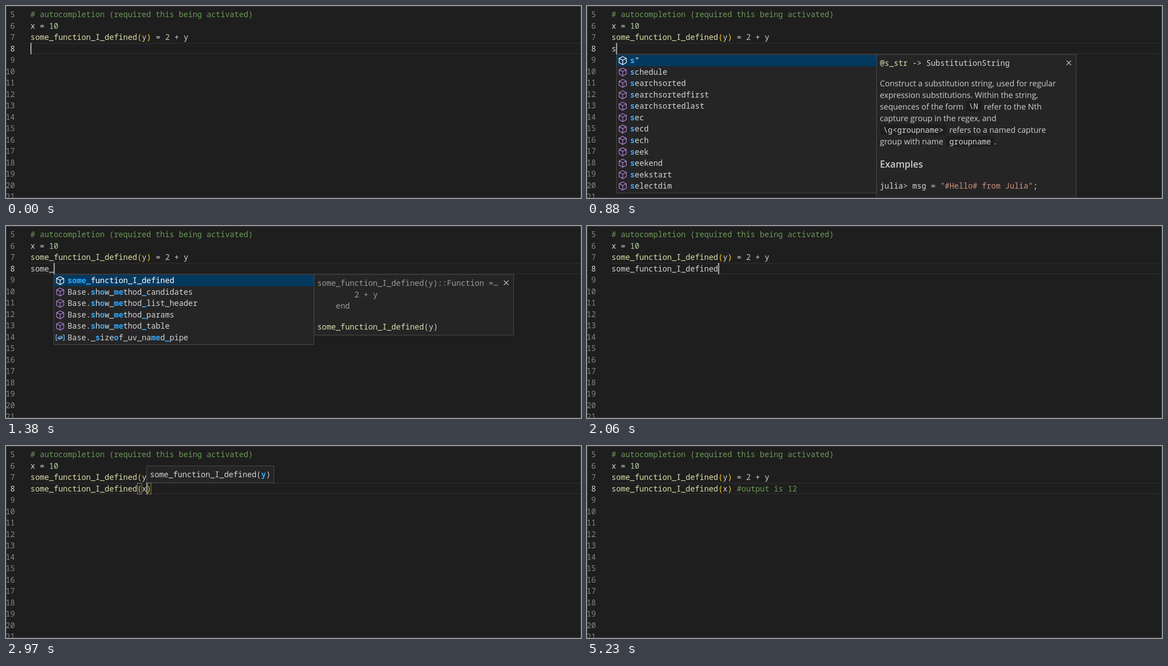
These frames come from a looping animation (1280 px wide and 430 px high, 5380 ms). An HTML page with a canvas:

```html
<!DOCTYPE html>
<html lang="en">
<head>
<meta charset="utf-8">
<title>Editor autocompletion</title>
<style>
html, body { margin: 0; width: 100%; height: 100%; overflow: hidden; background: #1e1e1e; }
canvas { display: block; }
</style>
</head>
<body>
<canvas id="stage" width="1280" height="430"></canvas>
<script>
const ctx = document.getElementById('stage').getContext('2d');
const LOOP = 5380, LEFT = 54.6, CHAR = 10.33, LINE = 25.53;
const MONO = '17.21px "Noto Sans Mono", "DejaVu Sans Mono", monospace';
const SANS = '17.75px "Open Sans", "Noto Sans", sans-serif';
const TEXT = '#d4d4d4', GRAY = '#9a9a9a', FUNC = '#dcdcaa', MATCH = '#2aaaff',
  COMMENT = '#6a9955', NUMBER = '#b5cea8', BRACKET = '#ffd700', STRING = '#ce9178',
  PURPLE = '#b180d7', BLUE = '#75beff', PANEL = '#252526', EDGE = '#4b4b4b';

const FN = 'some_function_I_defined';
const CODE = ['# autocompletion (required this being activated)', 'x = 10', FN + '(y) = 2 + y'];

const lists = {
  s: ['s"', 'schedule', 'searchsorted', 'searchsortedfirst', 'searchsortedlast', 'sec',
    'secd', 'sech', 'seek', 'seekend', 'seekstart', 'selectdim'],
  so: [FN, 'something', 'sort', 'sort!', 'sortperm', 'sortperm!', 'sortslices',
    'show', 'showerror', 'splitdrive', 'stdout', 'symlink'.replace('symlink', 'sizeof')],
  some: [FN, 'something', 'Base.show_method_candidates', 'Base.show_method_list_header',
    'Base.show_method_params', 'Base.show_method_table'],
  some_: [FN, 'Base.show_method_candidates', 'Base.show_method_list_header',
    'Base.show_method_params', 'Base.show_method_table', 'Base._sizeof_uv_named_pipe'],
  x: ['x', 'xor']
};
lists.so[11] = 'sizeof';
const variables = ['x', 'Base._sizeof_uv_named_pipe'];

// Each step: start time, typed text, cursor column (-1 = hidden), extras
const CALL = FN + '(x)', DONE = CALL + ' #output is 12';
const steps = [
  [0, '', 0],
  [250, '', -1],
  [620, '', 0],
  [880, 's', 1, { list: 's', at: 1, doc: macroDoc }],
  [1000, 'so', 2, { list: 'so', at: 1, doc: macroDoc }],
  [1140, 'som', 3, { list: 'some', at: 1, doc: functionDoc }],
  [1260, 'some', 4, { list: 'some', at: 1, doc: functionDoc }],
  [1380, 'some_', 5, { list: 'some_', at: 5, doc: functionDoc }],
  [1810, 'some_', -1, { list: 'some_', at: 5, doc: functionDoc }],
  [2060, FN, 23],
  [2430, FN + '()', 24, { pair: 24 }],
  [2580, CALL, 25, { pair: 25, hint: true }],
  [2730, CALL, 25, { pair: 25, hint: true, list: 'x', at: 25, doc: variableDoc }],
  [2970, CALL, 25, { pair: 25, hint: true }],
  [3090, CALL, 26, { pair: 25 }],
  [3340, CALL + ' ', 27],
  [3770, DONE, 40],
  [4200, DONE, -1],
  [4730, DONE, 40],
  [5230, DONE, -1]
];

function write(text, x, y, color = TEXT, font = MONO) {
  ctx.font = font;
  ctx.fillStyle = color;
  ctx.fillText(text, x, y);
}

// Monospaced pieces: [text, color, bold]
function writeRuns(runs, x, y) {
  for (const [text, color, bold] of runs) {
    write(text, x, y, color, bold ? 'bold ' + MONO : MONO);
    x += text.length * CHAR;
  }
}

function highlight(code) {
  const colors = [COMMENT, FUNC, BRACKET, NUMBER];
  return [...code.matchAll(/(#.*)|(\w+(?=\())|([()])|(\b\d+)|\w+|[^\w()#]+/g)].map(m =>
    [m[0], colors[[1, 2, 3, 4].findIndex(i => m[i])] || TEXT]);
}

function panel(x, y, w, h) {
  ctx.fillStyle = PANEL;
  ctx.fillRect(x, y, w, h);
  ctx.strokeStyle = EDGE;
  ctx.lineWidth = 1.2;
  ctx.strokeRect(x, y, w, h);
}

function lines(color, width, ...paths) {
  ctx.strokeStyle = color;
  ctx.lineWidth = width;
  ctx.beginPath();
  for (const path of paths)
    path.forEach(([x, y], i) => i ? ctx.lineTo(x, y) : ctx.moveTo(x, y));
  ctx.stroke();
}

function icon(x, y, color, variable) {
  ctx.save();
  ctx.translate(x, y);
  ctx.lineJoin = 'round';
  if (variable) {
    for (const s of [-1, 1])
      lines(color, 1.5, [[s * 6, -6], [s * 9, -6], [s * 9, 6], [s * 6, 6]]);
    lines(color, 1.4,
      [[-5, 0], [1, -3.5], [5, -1.5], [5, 1], [-1, 4], [-5, 2], [-5, 0], [-1, 1.8], [5, -1.5]],
      [[-1, 1.8], [-1, 4]]);
  } else {
    lines(color, 1.5,
      [[0, -9], [8, -5], [8, 4.6], [0, 9], [-8, 4.6], [-8, -5], [0, -9], [8, -5]],
      [[-8, -5], [0, -1], [8, -5]], [[0, -1], [0, 9]]);
  }
  ctx.restore();
}

// Marks the typed letters, in order, after any module prefix
function matchRuns(name, typed, color) {
  const start = name.indexOf('.') + 1;
  let next = 0;
  return [...name].map((c, i) => {
    const hit = i >= start && c === typed[next];
    if (hit) next++;
    return [c, hit ? MATCH : color, hit];
  });
}

function suggestions(names, typed, x) {
  panel(x + .5, 108.5, 579, names.length * LINE + 4);
  ctx.fillStyle = '#04395e';
  ctx.fillRect(x + 1, 109.5, 578, LINE);
  names.forEach((name, i) => {
    const mid = 122.3 + i * LINE, isVar = variables.includes(name);
    icon(x + 14.5, mid, i ? (isVar ? BLUE : PURPLE) : '#fff', isVar);
    writeRuns(matchRuns(name, typed, i ? TEXT : '#fff'), x + 31, mid + 6);
  });
}

function docPanel(x, height) {
  panel(x, 108.5, 444.5, height);
  const cx = x + 428, cy = 127.3, r = 5;
  lines('#d0d0d0', 1.4, [[cx - r, cy - r], [cx + r, cy + r]], [[cx + r, cy - r], [cx - r, cy + r]]);
}

function chip(text, x, y) {
  ctx.fillStyle = '#1e1e1e';
  ctx.beginPath();
  ctx.roundRect(x, y - 18.5, text.length * CHAR + 14, 24, 4);
  ctx.fill();
  write(text, x + 7, y);
}

function macroDoc(x) {
  docPanel(x, 400);
  const tx = x + 7.5;
  const prose = (text, dx, row) => write(text, tx + dx, 179.5 + row * 26, '#cccccc', SANS);
  writeRuns([['@s_str', FUNC], [' -> SubstitutionString', TEXT]], tx, 134);
  prose('Construct a substitution string, used for regular', 0, 0);
  prose('expression substitutions. Within the string,', 0, 1);
  prose('sequences of the form', 0, 2);
  chip('\\N', tx + 191, 231);
  prose('refer to the Nth', 231.5, 2);
  prose('capture group in the regex, and', 0, 3);
  chip('\\g<groupname>', tx + .5, 283.5);
  prose('refers to a named capture', 154.5, 4);
  prose('group with name', 0, 5);
  chip('groupname', tx + 147.5, 309.5);
  prose('.', 254.5, 5);
  write('Examples', tx, 361.5, '#cccccc', '600 20.8px "Open Sans", "Noto Sans", sans-serif');
  writeRuns([['julia> msg = ', TEXT], ['"#Hello# from Julia"', STRING], [';', TEXT]], tx, 409);
}

function functionDoc(x) {
  docPanel(x, 136);
  const tx = x + 7.5;
  write(FN + '(y)::Function =…', tx, 134, GRAY);
  write('2 + y', tx + 8 * CHAR, 159.5, GRAY);
  write('end', tx + 4 * CHAR, 185, GRAY);
  writeRuns([[FN, FUNC], ['(y)', TEXT]], tx, 232);
}

function variableDoc(x) {
  docPanel(x, 81);
  write('x::Int64 = 10', x + 7.5, 134, GRAY);
}

function drawEditor(typed) {
  ctx.fillStyle = '#1e1e1e';
  ctx.fillRect(0, 0, 1280, 430);
  ctx.fillStyle = '#292929';
  ctx.fillRect(54, 82.3, 1226, 2.2);
  ctx.fillRect(54, 105.8, 1226, 2.2);
  ctx.textAlign = 'right';
  for (let n = 5; n <= 21; n++)
    write(n, 19.8, 25 + (n - 5) * LINE, n === 8 ? '#d8d8d8' : '#858585');
  ctx.textAlign = 'left';
  [...CODE, typed].forEach((code, i) => writeRuns(highlight(code), LEFT, 25 + i * LINE));
}

function draw(now) {
  const t = now % LOOP;
  const [, typed, col, extra = {}] = steps.findLast(s => s[0] <= t);
  const { pair, hint, list, at, doc } = extra;
  drawEditor(typed);
  if (pair) {
    ctx.strokeStyle = '#888';
    ctx.lineWidth = 1.2;
    for (const c of [23, pair])
      ctx.strokeRect(LEFT + c * CHAR + .4, 83.2, CHAR - .8, 24.4);
  }
  if (col >= 0) {
    ctx.fillStyle = '#aeafad';
    ctx.fillRect(LEFT + col * CHAR - .3, 82.6, 2.4, 25.4);
  }
  if (hint) {
    panel(313, 44.5, 283.5, 37.5);
    writeRuns([[FN + '(', TEXT], ['y', MATCH, true], [')', TEXT]], 320.4, 69.5);
  }
  if (list) {
    const x = Math.round(LEFT + at * CHAR);
    doc(x + 579.5);
    suggestions(lists[list], typed.slice(typed.indexOf('(') + 1).replace(')', ''), x);
  }
  ctx.strokeStyle = '#505050';
  ctx.lineWidth = 1;
  ctx.strokeRect(.5, .5, 1279, 429);
}

const begin = performance.now();
function tick() {
  draw(performance.now() - begin);
  requestAnimationFrame(tick);
}
tick();
</script>
</body>
</html>
```
